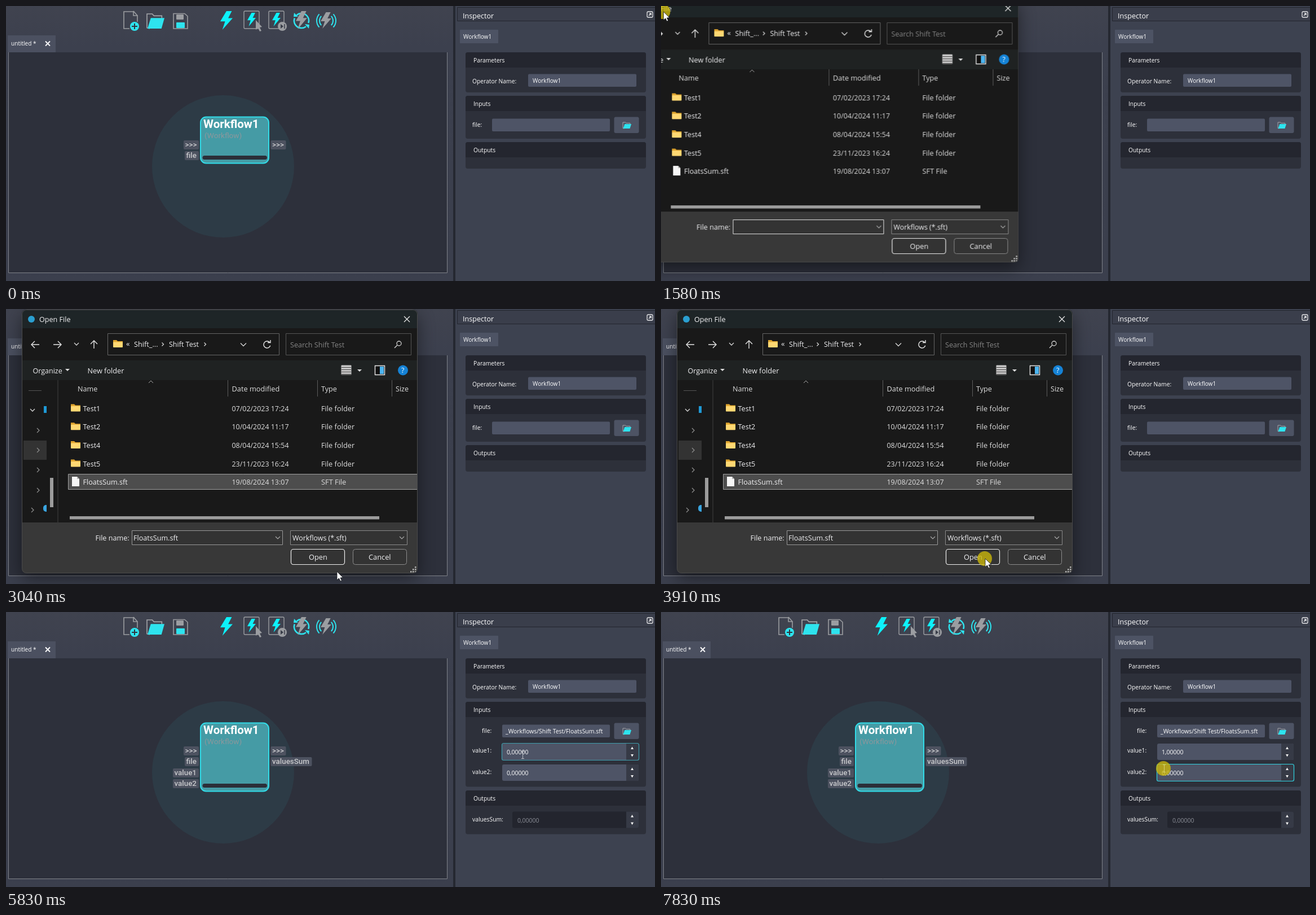
Recreate the animation shown at these times as an HTML page with a canvas. Size 1151x487 px, loop 8000 ms.

```html
<!DOCTYPE html>
<html lang="en">
<head>
<meta charset="utf-8">
<title>Workflow editor</title>
<style>
html, body { margin: 0; width: 100%; height: 100%; overflow: hidden; background: #3d4150; }
canvas { display: block; }
</style>
</head>
<body>
<canvas id="stage" width="1151" height="487"></canvas>
<script>
const LOOP = 8000, STEP = 66.4;
const SANS = '"Open Sans", "Noto Sans", sans-serif', ROBOTO = 'Roboto, sans-serif';
const CYAN = '#2ee3ee', FIELD = '#4e5466', BODY = '#2d303a', HEAD = '#24262f';
const main = document.getElementById('stage').getContext('2d');
const sheet = document.createElement('canvas');
sheet.width = 702; sheet.height = 467;
const dlg = sheet.getContext('2d');
let g = main;

function text(s, x, y, size = 10.4, color = '#f0f0f2', font = SANS, weight = 400) {
  g.font = `${weight} ${size}px ${font}`;
  g.fillStyle = color;
  g.fillText(s, x, y);
}
function label(s, x, y, size = 10.3, color = '#fff') {
  text(s, x, y, size, color, SANS, 500);
}
function box(x, y, w, h, r, fill, stroke, lw = 1) {
  g.beginPath();
  g.roundRect(x, y, w, h, r);
  if (fill) { g.fillStyle = fill; g.fill(); }
  if (stroke) { g.strokeStyle = stroke; g.lineWidth = lw; g.stroke(); }
}
function trace(pts) {
  g.beginPath();
  for (let i = 0; i < pts.length; i += 2) g.lineTo(pts[i], pts[i + 1]);
}
function line(pts, color, lw = 1) {
  trace(pts);
  g.strokeStyle = color; g.lineWidth = lw; g.stroke();
}
function poly(pts, fill) {
  trace(pts);
  g.closePath();
  g.fillStyle = fill; g.fill();
}
function disc(x, y, r, fill) {
  g.beginPath(); g.arc(x, y, r, 0, 7);
  g.fillStyle = fill; g.fill();
}
function arc(x, y, r, a, b, color, lw) {
  g.beginPath(); g.arc(x, y, r, a, b);
  g.strokeStyle = color; g.lineWidth = lw; g.stroke();
}
// direction: 0 right, 1 down, 2 left, 3 up
function chevron(x, y, dir, s = 4, color = '#d8d8d8', lw = 1.3) {
  g.save(); g.translate(x, y); g.rotate(dir * Math.PI / 2);
  line([-s / 2, -s, s / 2, 0, -s / 2, s], color, lw);
  g.restore();
}
function arrow(x, y, dir) {
  g.save(); g.translate(x, y); g.rotate(dir * Math.PI / 2);
  line([-7, 0, 7, 0], '#e8e8e8', 1.4);
  line([1, -6, 7, 0, 1, 6], '#e8e8e8', 1.4);
  g.restore();
}

// Position on a list of [time, x, y] keys
function along(keys, t) {
  let a = keys[0];
  for (const b of keys) {
    if (t < b[0]) {
      const p = Math.max(0, (t - a[0]) / (b[0] - a[0] || 1));
      return [a[1] + (b[1] - a[1]) * p, a[2] + (b[2] - a[2]) * p];
    }
    a = b;
  }
  return [a[1], a[2]];
}

const dialogKeys = [[1510, -165, -29], [1516, -140, -25], [1582, -68, -13], [1649, 4, -2], [1715, 28, 1]];
const pointerKeys = [
  [180, 1143, 262], [440, 1104, 212], [640, 1104, 212], [918, 347, 157], [985, 215, 105], [1180, -30, 5],
  [1450, -92, -6], [1510, -92, -6], [1516, -67, -2], [1582, 4, 10], [1649, 77, 21], [1715, 101, 24],
  [1850, 101, 24], [2080, 150, 150], [2400, 114, 309], [2700, 114, 309], [3043, 587, 465], [3370, 575, 442],
  [4900, 575, 442], [5080, 362, 330], [5240, 430, 205], [5420, 700, 121], [5600, 890, 180], [5700, 908, 247],
  [5832, 916, 253], [6380, 884, 247], [7030, 884, 247], [7370, 904, 310], [7670, 892, 277]
];
const clicks = [[450, 600], [1440, 1845], [2450, 2600], [3900, 3965], [6430, 6685], [7815, 8000]];

function bolt(x, y, w, h, color) {
  const shape = [.5, 0, .93, 0, .64, .38, 1, .38, .17, 1, .39, .55, 0, .55];
  poly(shape.map((v, i) => i % 2 ? y + v * h : x + v * w), color);
}
function folder(x, y, w, h, lw) {
  line([x + w * .16, y + h, x, y + h * .95, x, y, x + w * .3, y, x + w * .4, y + h * .13, x + w * .85, y + h * .13, x + w * .85, y + h * .3], '#a5a7ab', lw);
  poly([x + w * .03, y + h, x + w * .22, y + h * .28, x + w, y + h * .28, x + w * .83, y + h], CYAN);
}

function toolbar() {
  const gray = '#9b9da1';
  line([227, 10, 209, 10, 209, 40, 219, 40], gray, 1.6);
  line([226, 9, 226, 17, 233, 17, 233, 28], gray, 1.6);
  line([226, 9, 233, 17], gray, 1.6);
  disc(228, 36, 8, CYAN);
  line([223, 36, 233, 36], '#30343f', 2);
  line([228, 31, 228, 41], '#30343f', 2);
  folder(250, 14, 31, 26, 1.6);
  line([317, 13.5, 297, 13.5, 297, 40, 322, 40, 322, 18, 317, 13.5], gray, 1.6);
  box(302, 15, 13, 9, 1, gray);
  box(302, 29, 15, 10, 1, CYAN);
  bolt(380, 9, 22, 33, '#0df1fb');
  for (const x of [422, 466]) {
    box(x, 9, 27, 31, 2, null, gray, 1.4);
    bolt(x + 6, 12, 15, 24, '#0df1fb');
  }
  poly([443, 25, 443, 42, 447, 39, 450, 45, 453, 44, 450, 38, 454, 37], gray);
  disc(490, 36, 8, gray);
  poly([487, 32, 492, 36, 487, 40], '#383c48');
  line([494, 32, 494, 40], '#383c48', 1.5);
  arc(524, 26, 13, .9, 3.5, CYAN, 2.6);
  arc(524, 26, 13, 4, 6.6, CYAN, 2.6);
  poly([530, 32, 538, 33, 537, 40], CYAN);
  poly([518, 19, 510, 19, 511, 12], CYAN);
  bolt(514, 9, 20, 32, gray);
  bolt(558, 11, 19, 29, gray);
  for (const r of [12, 17]) {
    arc(568, 26, r, -.75, .75, CYAN, 2);
    arc(568, 26, r, Math.PI - .75, Math.PI + .75, CYAN, 2);
  }
}

function plug(s, x, y, w) {
  box(x, y, w, 16, 2, '#4d5260');
  text(s, x + 2.5, y + 12, 13.4, '#c9cacd', ROBOTO, 500);
}
function node(full) {
  const h = full ? 121 : 82;
  box(345, 196.5, 121, h, 10, '#459ba5', '#31dce8', 2);
  box(348.5, 196.5 + h - 13.5, 114.5, 7, 3.5, '#2b2e38');
  text('Workflow1', 350, 216, 20.5, '#fff', ROBOTO, 700);
  text('(Workflow)', 352, 234, 13.6, '#8d979c', ROBOTO);
  plug('>>>', 315, 238, 27);
  plug('file', 317, 257, 25);
  plug('>>>', 469.5, 238, 27);
  if (!full) return;
  plug('value1', 296, 277, 46);
  plug('value2', 296, 296, 46);
  plug('valuesSum', 469.5, 257, 73);
}

function panel(title, y, h) {
  box(815, y, 320, h, 4, BODY);
  box(815, y, 320, 27, [4, 4, 0, 0], HEAD);
  label(title, 829, y + 18);
}
function spinner(x, y, value, edge, off) {
  const w = 1122 - x;
  box(x, y, w, 29, 3, off ? '#23252e' : FIELD);
  box(1100, y, 22, 29, [0, 3, 3, 0], '#363a46');
  poly([1108, y + 10, 1110.5, y + 5.5, 1113, y + 10], '#f2f2f2');
  poly([1108, y + 19, 1110.5, y + 23.5, 1113, y + 19], '#f2f2f2');
  label(value, x + (off ? 9 : 8), y + 19, 10.5, off ? '#8a8d96' : '#fff');
  if (edge) box(x - .5, y - .5, w + 1, 30, 3, null, edge, 1.2);
}

function inspector(t, full) {
  g.fillStyle = '#3d4250'; g.fillRect(797, 0, 354, 487);
  g.fillStyle = '#252831'; g.fillRect(793, 0, 4, 487);
  box(800.5, 2.5, 352, 24, 0, '#3a3e4b', '#22252d');
  text('Inspector', 810, 22, 12.6, '#fff');
  box(1137, 10, 10, 10, 2, null, '#e8e8ea', 1.3);
  line([1140, 17, 1144, 13], '#fff', 1.2);
  line([1140.5, 13, 1144, 13, 1144, 16.5], '#fff', 1.2);
  box(805, 42, 68, 24, 1, '#4d5364');
  label('Workflow1', 811, 58, 10.1);

  panel('Parameters', 82, 71);
  label('Operator Name:', 827, 137);
  box(926, 120.5, 192, 22.5, 2, FIELD);
  label('Workflow1', 934, 136, 10.1);

  panel('Inputs', 159, full ? 150.5 : 76);
  label('file:', full ? 844 : 827, 214);
  box(full ? 880 : 862, 199.5, full ? 191 : 209, 22.5, 2, FIELD);
  box(1078.5, 196.5, 44, 28.5, 3, '#4d5364');
  folder(1094, 206, 15, 11, 1);
  if (!full) { panel('Outputs', 241, 47); return; }

  label('_Workflows/Shift Test/FloatsSum.sft', 886, 215, 10.4);
  const dim = '#3f9dab', bright = '#2fd3e2';
  const edge1 = t < 5690 || t >= 7815 ? null : t < 6430 ? dim : bright;
  const edge2 = t < 7220 ? null : t < 7815 ? dim : bright;
  label('value1:', 827, 249);
  spinner(880, 233, t < 7030 ? '0,00000' : '1,00000', edge1);
  if (t >= 6685 && t < 6825) { g.fillStyle = '#fff'; g.fillRect(888, 241, 1, 11); }
  label('value2:', 827, 287);
  spinner(880, 270, '0,00000', edge2);
  panel('Outputs', 316, 77.5);
  label('valuesSum:', 827, 371);
  spinner(898, 353.5, '0,00000', null, true);
}

function editor(full) {
  const sky = g.createLinearGradient(0, 0, 0, 487);
  sky.addColorStop(0, '#40434f');
  sky.addColorStop(.15, '#3c404e');
  sky.addColorStop(1, '#3b3f4d');
  g.fillStyle = sky; g.fillRect(0, 0, 793, 487);
  box(3, 52, 85, 30, 0, '#4b5060');
  label('untitled *', 9, 70, 10.1);
  line([70, 62.5, 78, 70.5], '#fff', 1.8);
  line([78, 62.5, 70, 70.5], '#fff', 1.8);
  g.fillStyle = '#2d303b'; g.fillRect(4, 82, 779, 391);
  line([4.5, 82, 4.5, 472.5, 782.5, 472.5, 782.5, 82], '#7f828a');
  disc(385, 284, 126, '#2d3b46');
  toolbar();
  node(full);
}

function yellowFolder(x, y) {
  poly([x, y, x + 6, y, x + 8, y + 2, x + 17, y + 2, x + 17, y + 12, x, y + 12], '#e0a52e');
  box(x, y + 3.5, 17, 9.5, 1, '#ffd873');
}
function caretDown(x, y) { poly([x - 4, y - 2, x + 4, y - 2, x, y + 2], '#ddd'); }

// Navigation and command bars; only blanks until the window has loaded
function dialogBars(ready) {
  if (ready) {
    box(180.5, 43.5, 304, 38, 0, '#191919', '#666');
    yellowFolder(190, 55);
    text('«', 213, 66, 13);
    text('Shift_...', 227, 67, 12.7);
    chevron(278, 62.5, 0, 3);
    text('Shift Test', 289, 67, 12.5);
    chevron(353, 62.5, 0, 3);
    chevron(421, 63, 1, 5);
    arc(463, 63, 6, .3, 5.6, '#e8e8e8', 1.4);
    line([464, 59.5, 469, 59.5, 469, 55], '#e8e8e8', 1.4);
    box(496.5, 43.5, 222, 38, 0, '#191919', '#555');
    text('Search Shift Test', 504, 68, 12.6, '#858585');
    arc(697, 61, 4, 0, 7, '#d0d0d0', 1.3);
    line([694, 64, 689, 69], '#d0d0d0', 1.4);
    text('Organize', 47.5, 113.5, 12.5);
    caretDown(109, 108);
    text('New folder', 144.5, 113.5, 12.7);
    box(594.5, 99.5, 18, 17, 1, '#c8c8c8');
    for (let y = 103; y < 116; y += 4) line([595, y + .5, 612, y + .5], '#444', 1);
    caretDown(627, 109);
  } else {
    g.fillStyle = '#f8f8f8';
    g.fillRect(180, 43, 305, 40);
    g.fillRect(495, 39.5, 225, 45);
  }
  box(654.5, 100.5, 17, 16, 0, '#111', '#e8e8e8', 1.4);
  box(663, 102, 7, 13, 0, '#4cb5f0');
  disc(704, 108.5, 9, '#1583d6');
  text('?', 701, 113, 12.5, '#fff');
}

// Coordinates below are those of the dialog resting at (28, 1)
function dialog(t) {
  g = dlg;
  g.setTransform(1, 0, 0, 1, 0, 0);
  g.clearRect(0, 0, 702, 467);
  g.save();
  g.beginPath(); g.roundRect(0, 0, 702, 467, 8); g.clip();
  g.translate(-28, -1);
  const bands = [[0, 34, '#1e2527'], [34, 91, '#191919'], [91, 126, '#1f2222'], [126, 378, '#191919'], [378, 470, '#383838']];
  for (const [y, end, color] of bands) { g.fillStyle = color; g.fillRect(28, y, 702, end - y); }

  disc(45, 18, 6, '#2a9fd0');
  text('Open File', 59, 22.5, 12.6);
  line([706, 13, 716, 23], '#e8e8e8', 1.3);
  line([716, 13, 706, 23], '#e8e8e8', 1.3);
  arrow(52, 63, 2); arrow(91, 63, 0); arrow(156, 63, 3);
  chevron(125, 62, 1);
  dialogBars(t > 1040);

  line([40, 144.5, 63, 144.5], '#555');
  box(31, 233, 41, 34, 0, '#333');
  chevron(47, 179, 1);
  box(67, 172, 5, 12, 0, '#1f9ad6');
  for (const y of [215, 250, 285, 321]) chevron(57, y, 0, 4, '#8c8c8c');
  chevron(47, 356, 0, 4, '#8c8c8c');
  box(66, 347, 6, 12, [5, 0, 0, 5], '#3aa5e0');
  box(78, 299, 6, 52, 0, '#9c9c9c');
  g.fillStyle = '#2c2c2c'; g.fillRect(91, 126, 2, 252);

  text('Name', 127, 145.5, 12.6, '#dedede');
  text('Date modified', 400.5, 145.5, 12.8, '#dedede');
  text('Type', 559, 145.5, 12.6, '#dedede');
  text('Size', 691, 145.5, 12.6, '#dedede');
  for (const x of [393.5, 552.5, 684.5]) line([x, 126, x, 155], '#5c5c5c');
  chevron(257, 129, 3, 4, '#aaa', 1);

  const picked = t > 2450;
  if (picked) box(110.5, 292.5, 625, 27, 0, '#4d4d4d', '#a0a0a0');
  const rows = [['Test1', '07/02/2023 17:24'], ['Test2', '10/04/2024 11:17'], ['Test4', '08/04/2024 15:54'],
    ['Test5', '23/11/2023 16:24'], ['FloatsSum.sft', '19/08/2024 13:07']];
  rows.forEach(([name, date], i) => {
    const y = 180.5 + i * 32.7, file = i === 4;
    if (file) {
      poly([117, 297, 126, 297, 130, 301, 130, 314, 117, 314], '#f6f6f6');
      poly([126, 297, 126, 301, 130, 301], '#b5b5b5');
    } else yellowFolder(115, y - 12);
    text(name, 136.5, y, 12.6);
    text(date, 400.5, y, 12.45, '#dedede');
    text(file ? 'SFT File' : 'File folder', 559, y, 12.8, '#dedede');
  });
  box(113, 367, 549, 5.5, 0, '#9c9c9c');

  text('File name:', 158.5, 410, 12.6);
  box(223.5, 392.5, 267, 25, 0, '#333', picked ? '#999' : '#e4e4e4');
  if (picked) text('FloatsSum.sft', 226, 410, 12.6);
  else if (t < 1310) line([227.5, 397, 227.5, 413], '#fff');
  chevron(482, 405, 1, 4, '#aaa', 1.1);
  box(504.5, 392.5, 207, 25, 0, '#333', '#8a8a8a');
  text('Workflows (*.sft)', 508, 410, 12.4);
  chevron(702, 405, 1, 4, '#aaa', 1.1);
  box(505.5, 425.5, 95, 27, 4, '#333', '#f0f0f0', 1.2);
  text('Open', 537, 443.5, 12.8);
  box(615.5, 425.5, 95, 27, 4, '#333', '#8c8c8c');
  text('Cancel', 643, 443.5, 12.8);
  for (let i = 0; i < 3; i++)
    for (let j = 0; j <= i; j++) { g.fillStyle = '#b5b5b5'; g.fillRect(725 - j * 4, 456 + i * 4, 2.5, 2.5); }
  box(28.5, 1.5, 701, 466, 8, null, '#4a4a4a');
  g.restore();
  g = main;
}

function placeDialog(t) {
  if (t < 852 || t >= 4090) return;
  const open = Math.min(1, (t - 852) / 140);
  const shut = Math.max(0, (t - 3960) / 130);
  const alpha = Math.min(1, open * 1.78) * (1 - shut);
  const scale = .9 + .1 * open - .1 * shut;
  const [x, y] = along(dialogKeys, t);
  dialog(t);
  g.save();
  g.globalAlpha = alpha;
  g.shadowColor = 'rgba(0,0,0,.45)';
  g.shadowBlur = 30;
  g.shadowOffsetY = 10;
  g.translate(x + 351, y + 233.5);
  g.scale(scale, scale);
  g.drawImage(sheet, -351, -233.5);
  g.restore();
}

function pointer(t) {
  if (t < 180) return;
  const [x, y] = along(pointerKeys, t);
  if (clicks.some(([a, b]) => t >= a && t < b)) disc(x - 1, y, 13, 'rgba(205,185,10,.78)');
  if (t > 5690) {
    const c = t > 7815 ? '#d8d070' : '#b9bcc4';
    line([x + .5, y - 6, x + .5, y + 6], c, 1);
    line([x - 2, y - 6.5, x + 3, y - 6.5], c, 1);
    line([x - 2, y + 6.5, x + 3, y + 6.5], c, 1);
    return;
  }
  g.save();
  g.translate(x, y);
  const shape = [0, 0, 0, 15, 3.5, 11.8, 6, 17, 8.4, 16, 6, 11, 10.6, 10.6];
  poly(shape, '#fff');
  g.strokeStyle = '#15171c'; g.lineWidth = .8; g.stroke();
  g.restore();
}

function draw(now) {
  const ms = now % LOOP;
  const t = 188 + Math.floor((ms - 180) / STEP) * STEP;
  const full = t > 4160;
  editor(full);
  inspector(t, full);
  placeDialog(t);
  pointer(t);
}

const start = performance.now();
function tick() {
  draw(performance.now() - start);
  requestAnimationFrame(tick);
}
tick();
</script>
</body>
</html>
```
